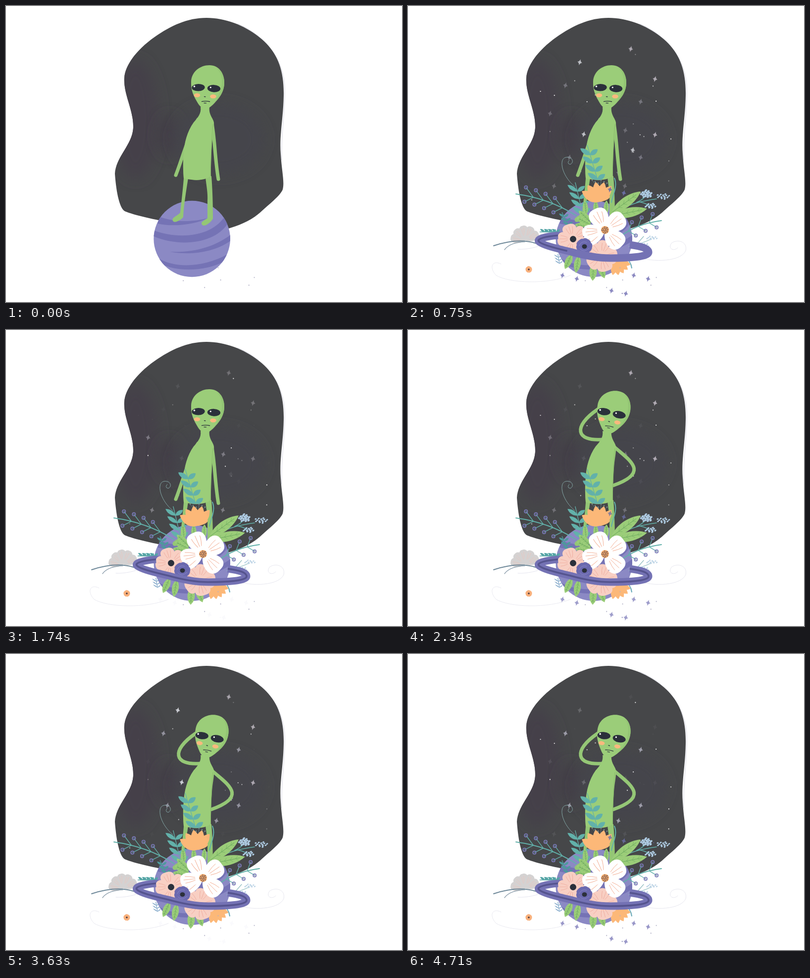
Recreate the animation shown at these times as an HTML page. Size 800 by 600 pixels, loop 4.74 s.

```html
<!DOCTYPE html>
<html lang="en">
<head>
<meta charset="utf-8">
<title>Alien on a flower planet</title>
<style>
html, body { margin: 0; width: 100%; height: 100%; overflow: hidden; background: #fff; }
svg { display: block; width: 800px; height: 600px; }
</style>
</head>
<body>
<svg id="stage" viewBox="0 0 800 600"></svg>
<script>
const LOOP = 4740;
const TEAL = '#62b1aa', GREEN = '#9bcd79', VEIN = '#6fab60', ORANGE = '#fcb878',
      PINK = '#f8cfc3', BLUSH = '#efada0', PURPLE = '#7573b5', SKY = '#aecbe2', INK = '#2b303b';

// drawing helpers
const times = (n, make) => Array.from({ length: n }, (_, i) => make(i)).join('');
const fill = (d, color) => `<path d="${d}" fill="${color}"/>`;
const line = (d, color, w = 1.5) =>
  `<path d="${d}" fill="none" stroke="${color}" stroke-width="${w}" stroke-linecap="round"/>`;
const oval = (x, y, rx, ry, color, turn = 0) =>
  `<ellipse cx="${x}" cy="${y}" rx="${rx}" ry="${ry}" fill="${color}" transform="rotate(${turn} ${x} ${y})"/>`;
const place = (x, y, turn, s) => `<g transform="translate(${x} ${y}) rotate(${turn})">${s}</g>`;

const blade = (l, w, color) => fill(`M0 0C${l * .25} ${-w} ${l * .7} ${-w} ${l} 0C${l * .7} ${w} ${l * .25} ${w} 0 0Z`, color);

function leaf(x1, y1, x2, y2, w, color = GREEN, veins = color === GREEN) {
  const len = Math.hypot(x2 - x1, y2 - y1);
  const turn = Math.atan2(y2 - y1, x2 - x1) * 180 / Math.PI;
  const barb = i => {
    const a = len * (.25 + i * .16), b = a + w * .4;
    return line(`M${b} ${-w * .35}L${a} 0L${b} ${w * .35}`, VEIN, .6);
  };
  return place(x1, y1, turn, blade(len, w, color) +
    (veins ? line(`M2 0L${len * .85} 0`, VEIN, 1) + times(4, barb) : ''));
}

function petal(l, w, color, vein) {
  const vane = i => {
    const k = i - 1;
    return line(`M${l * .35} ${k * w * .17}Q${l * .6} ${k * w * .38} ${l * (k ? .78 : .85)} ${k * w * .4}`, vein, .9);
  };
  return fill(`M0 0C${l * .3} ${-w} ${l * 1.03} ${-w * 1.25} ${l} ${-w * .1}C${l * 1.05} ${w * 1.2} ${l * .3} ${w} 0 0Z`, color) +
    (vein ? times(3, vane) : '');
}

// copies of one shape, turned evenly from one angle to another
const fan = (x, y, from, to, n, shape) =>
  times(n, i => place(x, y, from + (to - from) * i / (n - 1), shape));
const bloom = (x, y, start, l, w, color, vein) => fan(x, y, start, start + 288, 5, petal(l, w, color, vein));

// dots on a golden-angle spiral
const cluster = (x, y, rx, ry, n, dot, color) => times(n, i => {
  const r = Math.sqrt((i + .5) / n), a = i * 2.4;
  return oval(x + rx * r * Math.cos(a), y + ry * r * Math.sin(a), dot * 1.4, dot, color, -25);
});

function fern(x, y, dx, dy, n, size, color, w) {
  const pair = i => {
    const px = x + dx * i, py = y + dy * i;
    return leaf(px, py, px - size, py - size * .66, w, color) + leaf(px, py, px + size * .76, py - size * .56, w, color);
  };
  return line(`M${x} ${y}l${dx * (n + .2)} ${dy * (n + .2)}`, color, 1.3) + times(n, pair);
}

// stem along a quadratic curve with a berry above and below each node
function berryStem([ax, ay], [bx, by], [cx, cy], n, first, step, offsets) {
  const at = (a, b, c, t) => (1 - t) ** 2 * a + 2 * t * (1 - t) * b + t * t * c;
  const node = i => {
    const t = first + step * i, x = at(ax, bx, cx, t), y = at(ay, by, cy, t);
    return offsets.map(([dx, dy]) => line(`M${x} ${y}l${dx} ${dy}`, TEAL, 1.4) +
      `<circle cx="${x + dx}" cy="${y + dy}" r="3.2" fill="#5c5b86" fill-opacity=".25" stroke="#7d7cbb" stroke-width="1.6"/>`).join('');
  };
  return line(`M${ax} ${ay}Q${bx} ${by} ${cx} ${cy}`, TEAL, 2) + times(n, node);
}

// scenery
const blobD = 'M405 24C450 24 495 45 526 76C551 102 562 135 561 182C560 230 552 262 555 300C557 335 563 356 559 372C553 386 532 401 513 419C492 437 470 445 446 452L312 435C285 429 260 424 240 416C228 409 222 370 220 340C222 305 255 282 257 247C258 210 237 180 239 145C241 118 266 87 300 63C333 40 366 24 405 24Z';

const haze = (x, y, rx, ry, color) => `<ellipse cx="${x}" cy="${y}" rx="${rx}" ry="${ry}" fill="${color}" filter="url(#soft)"/>`;

const backdrop = `
  <defs>
    <filter id="soft" x="-60%" y="-60%" width="220%" height="220%"><feGaussianBlur stdDeviation="14"/></filter>
    <clipPath id="sky">${fill(blobD, '#000')}</clipPath>
    <clipPath id="globe"><circle cx="375.7" cy="472" r="77.3"/></clipPath>
  </defs>
  ${line('M468 36C528 63 563 112 563 170C563 230 555 260 557 312', '#e4e4ec')}
  ${fill(blobD, '#464749')}
  <g clip-path="url(#sky)">
    ${haze(262, 230, 45, 120, '#444149')}${haze(330, 262, 22, 40, '#433c46')}${haze(430, 270, 90, 70, '#44444b')}
  </g>`;

const planet = `
  <circle cx="375.7" cy="472" r="77.3" fill="#8b89c4"/>
  <g clip-path="url(#globe)">
    ${fill('M310 427C340 439 378 438 408 430C380 444 335 448 306 441Z', PURPLE)}
    ${fill('M296 454C345 473 412 470 441 428L448 441C422 482 350 490 296 466Z', PURPLE)}
    ${fill('M331 498C380 501 425 487 456 462L455 475C420 500 370 506 331 498Z', PURPLE)}
    ${fill('M306 510C340 533 400 530 448 503L442 517C405 538 345 540 312 522Z', PURPLE)}
  </g>`;

const alien = `
  <path id="armL" fill="none" stroke="#95c776" stroke-width="7" stroke-linecap="round"/>
  <path id="armR" fill="none" stroke="#95c776" stroke-width="7" stroke-linecap="round"/>
  ${fill('M358 325L359 350C357 375 354 400 352 419C347 424 340 427 337 431C335 437 340 439 345 437C350 435 355 432 358 428C359 405 364 375 368 349C380 354 394 354 403 348C405 365 408 380 407 395L407 430C402 434 396 436 395 440C395 446 402 446 406 443C411 440 416 435 418 431C418 400 417 370 415 345Z', '#94c675')}
  ${fill('M393 205C395 217 388 226 379 236C366 254 360 278 359 298C357 318 358 335 359 349C377 354 394 354 406 349L414 345C414 320 414 300 416 280C417 262 421 248 420 236C419 228 409 220 411 205Z', GREEN)}
  ${line('M418 240C415 270 414 300 413 344', '#8cbd6e', 1.2)}
  <g id="head">
    ${fill('M402 208C396 208 391 203 387 196C380 184 373 172 374 153C375 133 392 120 411 120C430 120 441 136 441 155C441 175 430 187 420 198C414 204 410 208 402 208Z', GREEN)}
    ${fill('M424 124C436 131 441 143 441 155C441 175 430 187 420 198C431 180 437 166 436 150C435 138 431 130 424 124Z', '#93c574')}
    ${oval(388.5, 165.3, 13.2, 7.3, INK, -2)}${oval(420, 167.3, 13.2, 7.4, INK, 3)}
    ${oval(380.5, 163, 1.8, 1.8, '#fff')}${oval(413.3, 165, 1.6, 1.6, '#fff')}
    ${oval(386, 181, 6.3, 4, '#f9b97e')}${oval(418.5, 183.3, 6.3, 4, '#f9b97e')}
    ${line('M400.5 183.6L402.8 184', INK, 1.4)}
    ${line('M395.5 193.6Q404 192 411.5 193.8', INK, 1.4)}${line('M400 196.6L404.5 196.8', INK, 1.2)}
  </g>`;

// plants
const swirls =
  line('M328 546C282 565 205 562 178 546C163 530 170 514 188 523', '#e9e9f0', 1) +
  line('M455 507C500 522 552 517 561 496C565 478 546 472 533 480C524 491 536 499 545 490', '#e6e6ee', 1) +
  line('M222 493C240 494 262 489 276 482', '#e4e4ee', 1) +
  line('M337 366C311 345 304 311 318 307C331 304 337 316 328 321C323 321 322 315 326 313', '#83a5a5', 1);

const berries =
  berryStem([340, 425], [285, 390], [218, 381], 4, .25, .16, [[-15, -20], [-18, 9]]) +
  berryStem([428, 468], [460, 442], [512, 435], 3, .25, .25, [[7, -18], [15, 9]]);

const ferns =
  fern(383, 352, -5, -16.7, 4, 20, TEAL, 6.5) +
  fern(353, 421, -3.6, -15, 4, 20, TEAL, 5.5) +
  fern(324, 444, -4, -8, 3, 11, '#4d9a9c', 3) +
  fern(300, 458, -8, 0, 4, 9, '#55a5a6', 3) +
  fern(306, 522, -1, -6, 3, 9, '#7da5c8', 1.2) +
  line('M417 349C424 365 414 382 411 398', TEAL, 2) + line('M437 508Q450 516 452 531', '#66a9b8', 2);

const sprigs =
  line('M428 414C450 400 474 395 502 391M462 398Q474 393 480 385M467 397Q478 399 487 404', TEAL, 1.6) +
  cluster(482, 381, 11, 8, 18, 1.9, SKY) + cluster(515, 386, 13, 6, 14, 1.5, SKY) + cluster(490, 405, 12, 5, 12, 1.6, SKY) +
  line('M446 488C462 484 476 480 492 472M462 483L476 467M465 482L482 487', '#8fbcc0', 1.2) +
  cluster(493, 470, 11, 4, 10, 1.3, '#bdd4e6') + cluster(477, 485, 10, 6, 10, 1.4, '#bdd4e6');

const leaves =
  leaf(411, 419, 470, 376, 13.5) + leaf(412, 426, 483, 411, 13) +
  times(3, i => leaf(360 + 20 * i, 423, 357 + 22 * i, 394, 7)) +
  times(3, i => leaf(370, 449 - 5 * i, 337 + 4 * i, 443 - 14 * i, 9)) +
  leaf(331, 503, 317, 533, 9) + leaf(345, 506, 339, 541, 9) +
  leaf(375, 522, 373, 557, 10) + leaf(386, 522, 397, 552, 9);

const greyBloom =
  fan(237, 475, -168, -28, 5, petal(30, 11, '#d4d2d2', '#e8c6bf')) +
  line('M173 486C200 477 230 472 258 481', '#6d8798', 2) + line('M195 494C203 483 220 478 236 478', '#8b9dab', 1.3);

const stamens = times(6, i => {
  const x = 372 + 6 * i, y = 353 + i % 3 * 3;
  return line(`M388 375L${x} ${y}`, '#6d8587', .8) + oval(x, y, 1.3, 1.3, '#778f92');
});

const flowers =
  greyBloom + bloom(244, 534, -80, 6.5, 4.5, '#f8b07c') + oval(244, 534, 1.8, 1.8, '#4a3940') +
  stamens + fan(386, 397, -148, -52, 5, blade(41, 12, ORANGE)) + oval(386, 389, 22, 8, ORANGE, -8) +
  fan(420, 515, 102, 18, 5, blade(31, 9, ORANGE)) +
  bloom(333, 472, -108, 31, 17, PINK, BLUSH) + oval(333.5, 472.5, 6.5, 6.5, INK) +
  bloom(391, 507, -70, 32, 19, PINK, BLUSH) +
  fan(398, 454, -114, 45, 3, petal(47, 23, '#fff', '#f2ab8f')) +
  fan(398, 454, 150, 174, 2, petal(46, 17, '#fff', '#f2ab8f')) +
  oval(398, 454, 8, 8, '#f7b06f') + cluster(398, 454, 7, 7, 20, .8, '#56424a') +
  bloom(356, 487, -60, 16, 11, '#6b69af') + oval(356, 487, 12, 11, '#6b69af') +
  line('M346 486Q350 475 361 479M347 492Q356 501 366 491', '#8987c6', 1) + oval(356.5, 487.5, 5, 4.6, INK);

// twinkling stars: each group pulses with its own period and peak time
let seed = 7;
const rand = (a, b) => {
  seed = seed * 16807 % 2147483647;
  return a + (b - a) * seed / 2147483647;
};
const twinkle = (period, peak, level, marks) =>
  `<g class="glow" data-wave="${period},${peak},${level}">${marks}</g>`;
const starD = 'M0 -6.5Q.9 -1.2 5 0Q.9 1.2 0 6.5Q-.9 1.2 -5 0Q-.9 -1.2 0 -6.5Z';
const sparks = (color, spots) => spots.map(([x, y]) => place(x, y, 14, fill(starD, color))).join('');
const dots = (n, color, x1, x2, y1, y2) => times(n, () => oval(rand(x1, x2), rand(y1, y2), 1.1, 1.1, color));
const skyDots = n => dots(n, '#fff', 250, 550, 80, 420);

const backStars = `<g clip-path="url(#sky)">` +
  twinkle(1600, 600, .38, sparks('#e0d8e3', [[450, 87], [499, 261], [499, 148]]) + skyDots(7)) +
  twinkle(3200, 430, .42, sparks('#e6e8ef', [[347, 114], [355, 260], [454, 292]])) +
  twinkle(4740, 4300, .35, sparks('#d0cee0', [[470, 307], [326, 307], [425, 338], [470, 194], [318, 161]])) +
  twinkle(4740, 1600, .2, sparks('#d5d1dc', [[287, 218], [295, 365], [438, 365], [439, 252]])) +
  twinkle(3000, 1600, .48, skyDots(7)) + twinkle(1900, 700, .48, skyDots(8)) + '</g>';

const frontStars =
  twinkle(1900, 700, .48, sparks('#8482bd', [[312, 546], [341, 553], [411, 577], [440, 583], [456, 546], [485, 553]]) +
    sparks('#6c70a6', [[408, 372], [436, 379]]) + dots(8, '#6766a2', 260, 520, 370, 600)) +
  dots(6, '#b3b2c6', 275, 525, 510, 598);

const ringD = 'M303 465C278 467 260 472 264 477C269 484 302 492 328 498C360 507 386 511 408 511C450 511 484 508 486 500C487 491 470 487 448 484';
const trim = (id, color, w) =>
  `<path id="${id}" d="${ringD}" pathLength="1" fill="none" stroke="${color}" stroke-width="${w}" stroke-linejoin="round"/>`;

const $ = id => document.getElementById(id);
$('stage').innerHTML = backdrop + backStars + planet + alien +
  `<g id="plants">${swirls}${ferns}${berries}${sprigs}${leaves}${flowers}</g>` +
  trim('band', '#7472b4', 15) + trim('groove', '#55548e', 3.6) + frontStars;

// motion
const ramp = (t, a, b) => Math.min(1, Math.max(0, (t - a) / (b - a)));
const ease = k => k * k * (3 - 2 * k);

function spring(t) {
  const s = Math.max(0, t - 60) / 1000;
  return 1 - Math.exp(-13.8 * s) * Math.cos(26.2 * s);
}

// shoulder, two bend points and hand, blended between hanging and bent
function bendArm(el, hang, bent, k) {
  const v = hang.map((n, i) => n + (bent[i] - n) * k);
  el.setAttribute('d', `M${v.slice(0, 2)}C${v.slice(2)}`);
}

function setTrim(el, k) {
  el.style.visibility = k > 0 ? 'visible' : 'hidden';
  el.setAttribute('stroke-dasharray', k < 1 ? `${k} 2` : 'none');
}

const lights = [...document.querySelectorAll('.glow')].map(el => [el, ...el.dataset.wave.split(',').map(Number)]);
const plants = $('plants'), band = $('band'), groove = $('groove');
const head = $('head'), armL = $('armL'), armR = $('armR');

function draw(t) {
  const grow = spring(t);
  plants.style.visibility = grow > 0 ? 'visible' : 'hidden';
  plants.setAttribute('transform', `translate(372 425) scale(${grow}) translate(-372 -425)`);
  setTrim(band, ease(ramp(t, 60, 510)));
  setTrim(groove, ease(ramp(t, 520, 1120)));

  const pose = ease(ramp(t, 1800, 2280));
  head.setAttribute('transform', `translate(${pose} ${1.5 * pose}) rotate(${8 * pose} 401.5 209.5)`);
  bendArm(armL, [388, 230, 366, 268, 356, 310, 343, 343], [392, 222, 340, 226, 332, 196, 383, 161], pose);
  bendArm(armR, [416, 238, 422, 270, 422, 310, 429, 351], [417, 237, 444, 262, 492, 288, 415, 315], pose);

  const fade = ramp(t, 60, 300);
  for (const [el, period, peak, level] of lights)
    el.setAttribute('opacity', fade * level * (1 + .95 * Math.cos(2 * Math.PI * (t - peak) / period)));
}

function tick() {
  draw(performance.now() % LOOP);
  requestAnimationFrame(tick);
}
tick();
</script>
</body>
</html>
```
